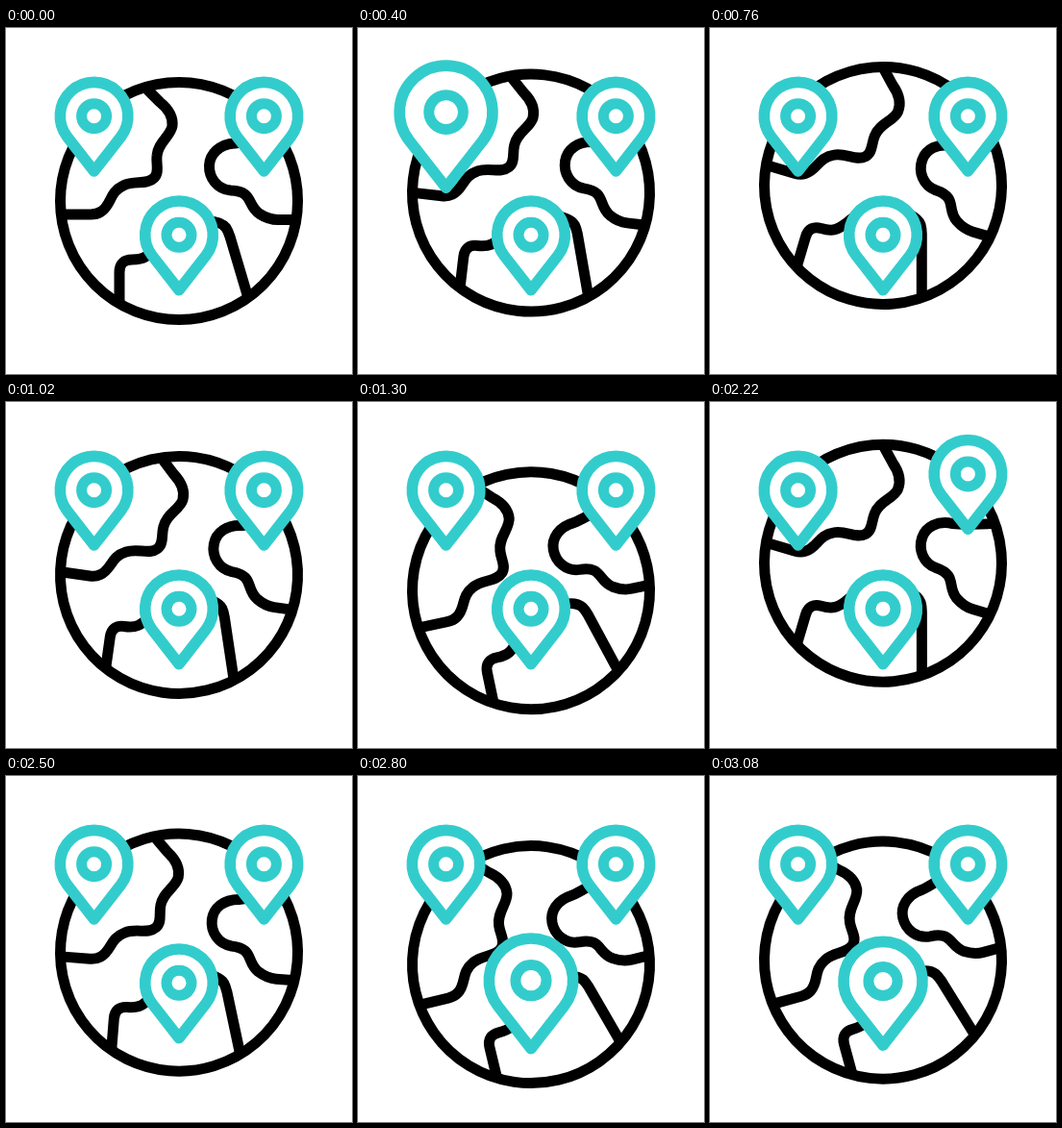
Write an HTML page that moves like this. It is 360 by 360 pixels and loops after 3.1 s.

```html
<!DOCTYPE html>
<html lang="en">
<head>
<meta charset="utf-8">
<title>Globe with map pins</title>
<style>
  html, body { margin: 0; width: 100%; height: 100%; overflow: hidden; background: #fff; }
  svg { display: block; width: 100vw; height: 100vh; }

  .globe, .pin {
    --sine: cubic-bezier(.364, 0, .636, 1);
    --quad: cubic-bezier(.33, 0, .67, .34);
    animation: 3100ms var(--sine) infinite;
  }
  .globe {
    fill: none; stroke: #000; stroke-width: 11; stroke-linejoin: round;
    transform-origin: 180px 180px;
    animation-name: float, sway;
  }
  .pin {
    fill: #fff; stroke: #33cccc; stroke-width: 11.6; stroke-linejoin: round;
    transform-origin: 0 11px;
  }
  /* pins grow while their line weight stays the same */
  #pin * { vector-effect: non-scaling-stroke; }
  .left { animation-name: pulse-left; }
  .right { animation-name: pulse-right, hop; }
  .front { animation-name: pulse-front; }

  @keyframes float {
    0%, 3.23% { translate: 0 0; }
    22.58% { translate: 0 -16.8px; }
    43.23% { translate: 0 16.5px; }
    65.16% { translate: 0 -16.8px; }
    92.26% { translate: 0 16.5px; animation-timing-function: var(--quad); }
    100% { translate: 0 11.6px; }
  }
  @keyframes sway {
    0%, 3.23% { rotate: 0deg; }
    25.48% { rotate: 16.6deg; }
    47.42% { rotate: -16.6deg; }
    70.65% { rotate: 16.6deg; }
    94.84% { rotate: -16.2deg; animation-timing-function: var(--quad); }
    100% { rotate: -15.2deg; }
  }
  @keyframes pulse-left {
    0%, 3.87%, 23.23%, 100% { scale: 1; }
    13.55% { scale: 1.375; }
  }
  @keyframes pulse-right {
    0%, 47.74%, 67.1%, 100% { scale: 1; }
    57.42% { scale: 1.375; }
  }
  @keyframes hop {
    0%, 63.87%, 77.42%, 100% { translate: 0 0; }
    70.5% { translate: 0 -18px; }
  }
  /* the loop cuts off while this pin is still shrinking */
  @keyframes pulse-front {
    0%, 84.52% { scale: 1; }
    94.19% { scale: 1.36; animation-timing-function: cubic-bezier(.33, 0, .67, .5); }
    100% { scale: 1.125; }
  }
</style>
</head>
<body>
<svg viewBox="0 0 360 360">
  <defs>
    <g id="pin">
      <path d="M0 57.3L-27.8 21.7A35.3 35.3 0 1 1 27.8 21.7Z"/>
      <circle r="13" stroke-width="11"/>
    </g>
  </defs>
  <g class="globe">
    <circle cx="180" cy="180" r="123.5"/>
    <path d="M145 62L160 77C170 85 174 93 173 102C171 113 158 119 157 133C156 142 160 150 154 156C146 164 134 158 122 164C107 171 110 184 99 191C96 193 93 194 88 194H58"/>
    <path d="M281 107C264 113 250 118 238 120C222 121 212 131 211.5 143C211 156 220 168 234 169C258 170 250 184 264 193.5C271 198 277 199.5 283 199.5H303"/>
    <path d="M118 286V254C118 245 123 241 131 241C144 241 148 237 154 229C162 216 172 206 190 203C205 200 222 199 229 208C231 211 232 214 233 217L252 281"/>
  </g>
  <g transform="translate(91.6 91.7)"><use href="#pin" class="pin left"/></g>
  <g transform="translate(268.4 91.7)"><use href="#pin" class="pin right"/></g>
  <g transform="translate(180 215.3)"><use href="#pin" class="pin front"/></g>
</svg>
</body>
</html>
```
